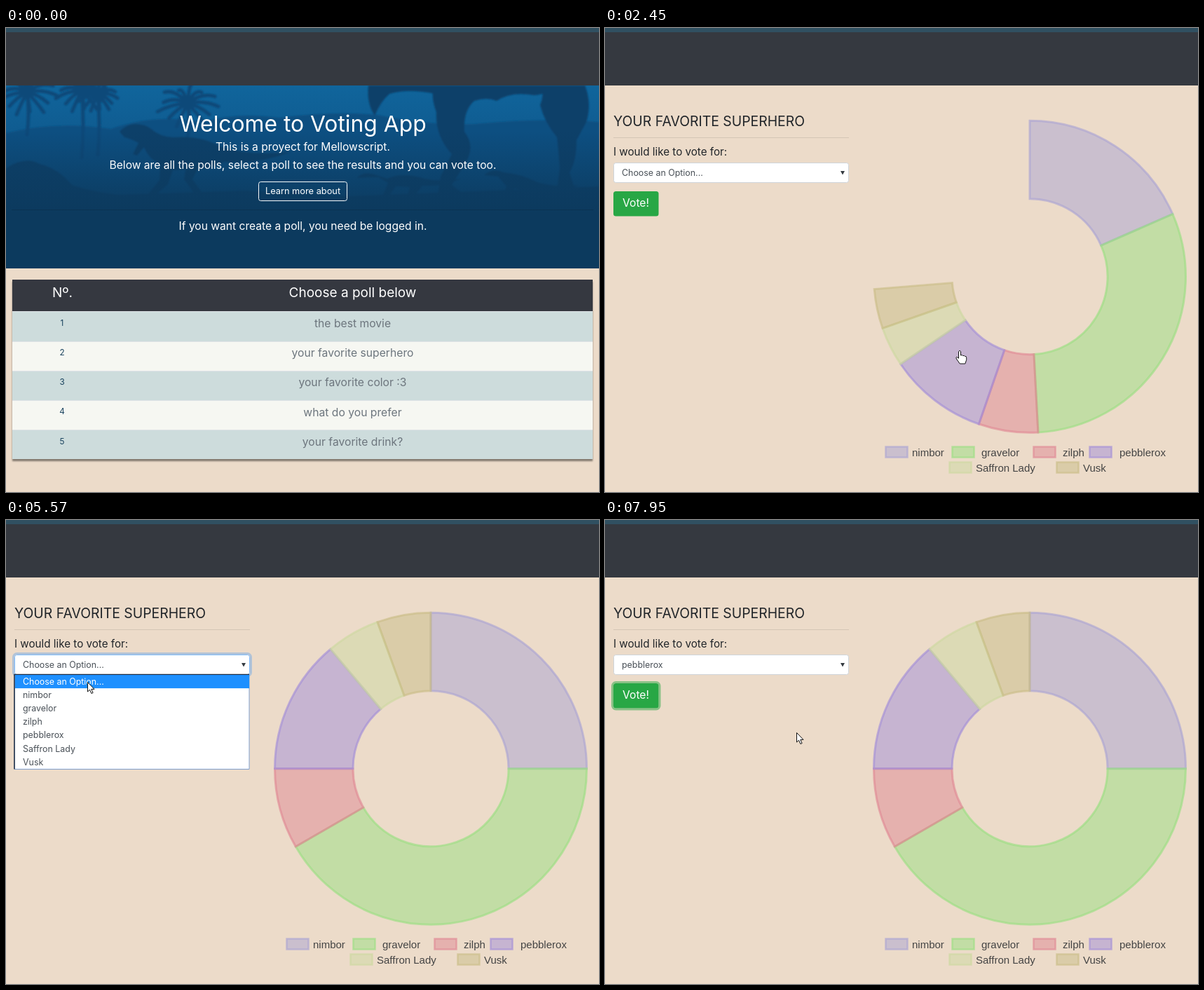
An HTML page for the animation above (8000 ms loop, 846x662 px).

```html
<!DOCTYPE html>
<html lang="en">
<head>
<meta charset="utf-8">
<title>Voting App</title>
<style>
  html, body { margin: 0; height: 100%; overflow: hidden; background: #ecdbc9; }
  svg { display: block; width: 100vw; height: 100vh; }
  text { font: 15.6px Inter, sans-serif; }
  .mid { text-anchor: middle; }
  .light text, text.light { fill: #fff; }
  .legend text { font: 15px "Liberation Sans", Arial, sans-serif; fill: #444; }
  .field { font-size: 12.4px; fill: #495057; }
  .link { font-size: 15.7px; fill: #6c757d; }
  .link.hover { fill: #fff; text-decoration: underline; }
  .number { font-size: 11.7px; fill: #17405c; }
</style>
</head>
<body>
<svg viewBox="0 0 846 662">
  <defs>
    <linearGradient id="sky" x2="0" y2="1">
      <stop stop-color="#10659c"/><stop offset=".35" stop-color="#0f588c"/><stop offset=".68" stop-color="#0c3a5f"/>
    </linearGradient>
    <linearGradient id="shade" x2="0" y2="1">
      <stop offset=".25" stop-color="#0c3a5e" stop-opacity="0"/><stop offset=".7" stop-color="#0c3a5e"/>
    </linearGradient>
    <filter id="soft"><feGaussianBlur stdDeviation="1.2"/></filter>
    <filter id="drop" x="-5%" width="110%" y="-5%" height="115%">
      <feDropShadow dx="0" dy="3" stdDeviation="1.3" flood-opacity="0.45"/>
    </filter>
    <clipPath id="heroClip"><path d="M0 82h846v261H0z"/></clipPath>
  </defs>
  <rect width="846" height="662" fill="#ecdbc9"/>
  <rect width="846" height="82" fill="#353940"/>
  <rect width="846" height="6" fill="#305061"/>

  <g id="home">
    <g clip-path="url(#heroClip)">
      <rect y="82" width="846" height="262" fill="url(#sky)"/>
      <g filter="url(#soft)">
        <path fill="#0f4f81" d="M0 150q70-18 150-6 60-22 130-10 50-14 110-6 80-10 140-4 90 18 150 12 90-8 166-2v210H0z"/>
        <path id="palms" fill="none" stroke="#0f4979" stroke-width="5" stroke-linecap="round"/>
        <g fill="#0d3f69">
          <path d="M0 200q28-18 48-6 26 6 46 30 30 10 66 14l180-6 150 8 356-14v120H0z"/>
          <path d="M162 148q8-10 22-11 15 0 23 7 14 12 32 12 38-3 67 13 40 14 100 8-46 18-94 14-25 12-38 9l-8 16 13 18 10 4h-19l-16-22 2-14-18 1-7 20-17 15h-12l17-21 1-22q-18-10-23-25l-10 12-6-2 8-16q-11-6-20-8z"/>
          <path d="M517 82h110l-14 12q-40-8-66 0-12 10-21 31-12-18-9-43z"/>
          <path d="M610 82h170q-6 12-26 14-34-6-54 8-14-6-32 0-16 14-14 44 16 20 2 44l-20 32 18 14h-38l4-26 16-32q-24-26-22-60-8-20-4-38z"/>
          <path d="M764 82h62q10 26 2 52l-14 26q0 30-10 46l8 26h-26l4-32q-2-26-4-44-18-22-24-46 6-14 2-28z"/>
          <path d="M500 214q10-10 26-5l18 6q20-10 54 0 22 5 52 0-28 12-56 10l-14 18h-8l4-16-20-1-12 17h-8l9-22-14-8z"/>
          <path d="M682 210q12-11 28-4 24 2 48 14 26 8 60 4-30 12-60 8l-10 20h-10l5-20-18-3-12 23h-8l9-26-12-14z"/>
        </g>
      </g>
      <rect y="82" width="846" height="262" fill="url(#shade)"/>
    </g>
    <path d="M8 259.500h830" stroke="#000" stroke-opacity=".14"/>
    <rect x="360.500" y="219.500" width="126" height="27" rx="3" fill="none" stroke="#f8f9fa"/>
    <g class="light mid">
      <text x="423.500" y="148" style="font-size:31.800px">Welcome to Voting App</text>
      <text x="423.500" y="174.500">This is a proyect for Mellowscript.</text>
      <text x="423.500" y="200.800">Below are all the polls, select a poll to see the results and you can vote too.</text>
      <text x="423.500" y="237" style="font-size:12.800px">Learn more about</text>
      <text x="423.500" y="287.500">If you want create a poll, you need be logged in.</text>
    </g>
    <rect x="9" y="359" width="828" height="256" fill="#353940" filter="url(#drop)"/>
    <g class="light mid">
      <text x="80.500" y="384" style="font-size:19px">Nº.</text>
      <text x="494.500" y="384" style="font-size:19px">Choose a poll below</text>
    </g>
    <g id="rows" class="mid"></g>
  </g>

  <g id="poll">
    <path d="M12 156.500h336" stroke="#000" stroke-opacity=".1"/>
    <text x="12" y="139.500" fill="#212529" style="font-size:19.400px">YOUR FAVORITE SUPERHERO</text>
    <text x="12" y="182" fill="#212529" style="font-size:15.200px">I would like to vote for:</text>
    <rect id="selectRing" x="10.500" y="190.500" width="339" height="32" rx="5" fill="none" stroke="#007bff" stroke-opacity=".25" stroke-width="3"/>
    <rect id="select" x="12.500" y="192.500" width="335" height="28" rx="3" fill="#fff"/>
    <text id="value" class="field" x="24" y="211"></text>
    <path d="M336 204h6l-3 5.500z" fill="#343a40"/>
    <rect id="voteRing" x="10.500" y="231.500" width="67.500" height="38.500" rx="5" fill="none" stroke="#28a745" stroke-opacity=".5" stroke-width="3"/>
    <rect id="vote" x="12" y="233" width="64.500" height="35.500" rx="3.500"/>
    <text class="light mid" x="44" y="255">Vote!</text>
    <g id="chart" stroke-width="3"></g>
    <g id="legend" class="legend"></g>
    <g id="tooltip">
      <path d="M584 507h61q3 0 3 3v2l3.500 3.500-3.500 3.500v1q0 3-3 3h-61q-3 0-3-3v-10q0-3 3-3z" fill="#000" fill-opacity=".8"/>
      <text class="mid light" x="615" y="519" style="font:bold 8.500px 'Liberation Sans',sans-serif">gravelor: 15</text>
    </g>
    <g id="list">
      <path d="M12 220.500h335v135H12z" fill="#fff" stroke="#7d9fd0"/>
      <path d="M347 220.500H12v135" fill="none" stroke="#1d2b40" stroke-width="1.500"/>
      <rect id="highlight" x="13" width="334" height="19.100" fill="#1e90ff"/>
      <g id="options"></g>
    </g>
  </g>

  <circle id="click" r="12" fill="#ff0" fill-opacity=".47"/>
  <g id="cursor" fill="#fff" stroke="#111" stroke-linejoin="round">
    <path id="arrow" d="M.5.500v13.500l3-2.800 2.400 5.300 2.200-1-2.300-5.100h4.200z"/>
    <path id="hand" d="M-1.500 1.500q1.500-2.500 3 0v5.500q2.800-1 3 .6 2.500-.6 3 .8 2.200-.4 2.200 2v3l-1.900 5.600h-7.500l-4.300-6q-2-3-.6-3.400 1.400-.3 3.100 1.700z"/>
  </g>
</svg>
<script>
const $ = id => document.getElementById(id);
const LOOP = 8000, ROW = 42.2, ITEM = 19.1, LIST_TOP = 221;
const CX = 606, CY = 354.700, OUTER = 222.500, INNER = 111;

const polls = ["the best movie", "your favorite superhero", "your favorite color :3",
  "what do you prefer", "your favorite drink?"];
// name, votes, colour, legend box x, y, label x
const heroes = [
  ["nimbor", 9, "170,163,211", 400, 597, 438],
  ["gravelor", 15, "154,223,129", 495, 597, 537],
  ["zilph", 3, "224,135,147", 611, 597, 653],
  ["pebblerox", 5, "162,141,217", 691, 597, 734],
  ["Saffron Lady", 2, "206,217,161", 491, 619, 529],
  ["Vusk", 2, "202,189,135", 644, 619, 682]
];
const prompt = "Choose an Option...";
const choices = [prompt, ...heroes.map(h => h[0])];
const votes = heroes.reduce((sum, h) => sum + h[1], 0);
const paint = color => `fill="rgba(${color},.5)" stroke="rgba(${color},.62)"`;

$("rows").innerHTML = polls.map((poll, i) => {
  const y = Math.round(404.400 + i * ROW), bottom = Math.round(404.400 + (i + 1) * ROW);
  return `<rect x="9" y="${y}" width="828" height="${bottom - y}" fill="${i % 2 ? "#f6f7f2" : "#cddcdc"}"/>
    <path d="M9 ${y + .5}h828" stroke="#dee2e6"/>
    <text class="number" x="80" y="${404 + i * ROW + 20.700}">${i + 1}</text>
    <text class="link" x="494.500" y="${404 + i * ROW + 23}">${poll}</text>`;
}).join("");
const link = document.querySelectorAll(".link")[1];

$("legend").innerHTML = heroes.map(([name, , color, x, y, labelX]) =>
  `<rect x="${x + .5}" y="${y + .5}" width="31" height="15" stroke-width="2.500" ${paint(color)}/>
   <text x="${labelX}" y="${y + 14}">${name}</text>`).join("");
$("chart").innerHTML = heroes.map(h => `<path ${paint(h[2])}/>`).join("");
$("options").innerHTML = choices.map((c, i) =>
  `<text class="field" x="24" y="${LIST_TOP + 14 + i * ITEM}">${c}</text>`).join("");

// Palm fronds radiate from each crown; trunks drop straight down.
const palm = (x, y, size, trunk) => Array.from({ length: 13 }, (_, i) => {
  const a = i / 13 * 2 * Math.PI, r = size * (i % 2 ? .8 : 1);
  return `M${x} ${y}q${r * .5 * Math.cos(a)} ${r * .5 * Math.sin(a) - 6} ${r * Math.cos(a)} ${r * .7 * Math.sin(a) + 4}`;
}).join("") + `M${x} ${y}q4 ${trunk / 2} 0 ${trunk}`;
$("palms").setAttribute("d",
  palm(30, 92, 42, 60) + palm(108, 90, 38, 95) + palm(131, 96, 28, 85) + palm(259, 108, 44, 50));

const clamp = v => Math.min(1, Math.max(0, v));
const ramp = (t, from, to) => clamp((t - from) / (to - from));
const within = (t, from, to) => t >= from && t < to;
const show = (id, on) => $(id).style.display = on ? "" : "none";
const polar = (r, a) => `${CX + r * Math.sin(a)} ${CY - r * Math.cos(a)}`;

function ring(from, to) {
  const big = to - from > Math.PI ? 1 : 0;
  return `M${polar(OUTER, from)}A${OUTER} ${OUTER} 0 ${big} 1 ${polar(OUTER, to)}` +
    `L${polar(INNER, to)}A${INNER} ${INNER} 0 ${big} 0 ${polar(INNER, from)}Z`;
}

// time, x, y
const path = [
  [370, 669, 602], [900, 506, 460], [2650, 506, 460], [2990, 477, 443],
  [3540, 518, 339], [4000, 518, 339], [4250, 275, 166], [4450, 167, 209],
  [4780, 117, 207], [4900, 117, 207], [5230, 120, 214], [5400, 120, 214],
  [5780, 110, 254], [6010, 110, 254], [6270, 101, 319], [6490, 101, 322],
  [6640, 98, 338], [6820, 95, 306], [7270, 95, 306], [7480, 48, 250],
  [7600, 48, 250], [7950, 273, 303]
];
const clicks = [[1610, 1840], [4830, 4920], [6880, 6960], [7520, 7600]];

function cursorAt(t) {
  const next = path.findIndex(p => p[0] > t);
  if (next < 1) return path[next < 0 ? path.length - 1 : 0].slice(1);
  const a = path[next - 1], b = path[next];
  const k = ramp(t, a[0], b[0]), s = k * k * (3 - 2 * k);
  return [a[1] + (b[1] - a[1]) * s, a[2] + (b[2] - a[2]) * s];
}

function drawChart(t) {
  const grown = 1 - (1 - ramp(t, 2167, 3167)) ** 4;
  const hover = within(t, 2800, 3300);
  let angle = 0;
  heroes.forEach(([, count, color], i) => {
    const end = angle + count / votes * 2 * Math.PI * grown;
    const slice = $("chart").children[i];
    slice.setAttribute("d", ring(angle, end));
    slice.setAttribute("fill", `rgba(${color},${hover && i === 1 ? .57 : .5})`);
    angle = end;
  });
  $("tooltip").setAttribute("opacity", ramp(t, 2800, 2960) * (1 - ramp(t, 3300, 3500)));
}

function draw(t) {
  const [x, y] = cursorAt(t);
  const onPoll = t >= 2140, open = within(t, 4830, 6960), focused = within(t, 4830, 7520);
  const onVote = t > 7270 && x > 12 && x < 76 && y > 233 && y < 268;
  const hand = within(t, 820, 2650) || onVote;

  show("home", !onPoll);
  show("poll", onPoll);
  link.classList.toggle("hover", t >= 820);
  drawChart(t);

  $("value").textContent = t < 6960 ? prompt : heroes[3][0];
  $("select").setAttribute("stroke", focused ? "#80bdff" : "#ced4da");
  $("vote").setAttribute("fill", onVote ? "#218838" : "#28a745");
  show("selectRing", focused);
  show("voteRing", t >= 7520);
  show("list", open);
  const current = Math.min(6, Math.max(0, Math.floor((y - LIST_TOP) / ITEM)));
  $("highlight").setAttribute("y", LIST_TOP + current * ITEM);
  [...$("options").children].forEach((o, i) => o.style.fill = i === current ? "#fff" : "");

  const place = `translate(${Math.round(x)} ${Math.round(y)})`;
  $("cursor").setAttribute("transform", place);
  $("click").setAttribute("transform", place);
  show("cursor", t >= 370);
  show("arrow", !hand);
  show("hand", hand);
  show("click", clicks.some(([from, to]) => within(t, from, to)));
}

const start = performance.now();
function frame() {
  draw((performance.now() - start) % LOOP);
  requestAnimationFrame(frame);
}
frame();
</script>
</body>
</html>
```
